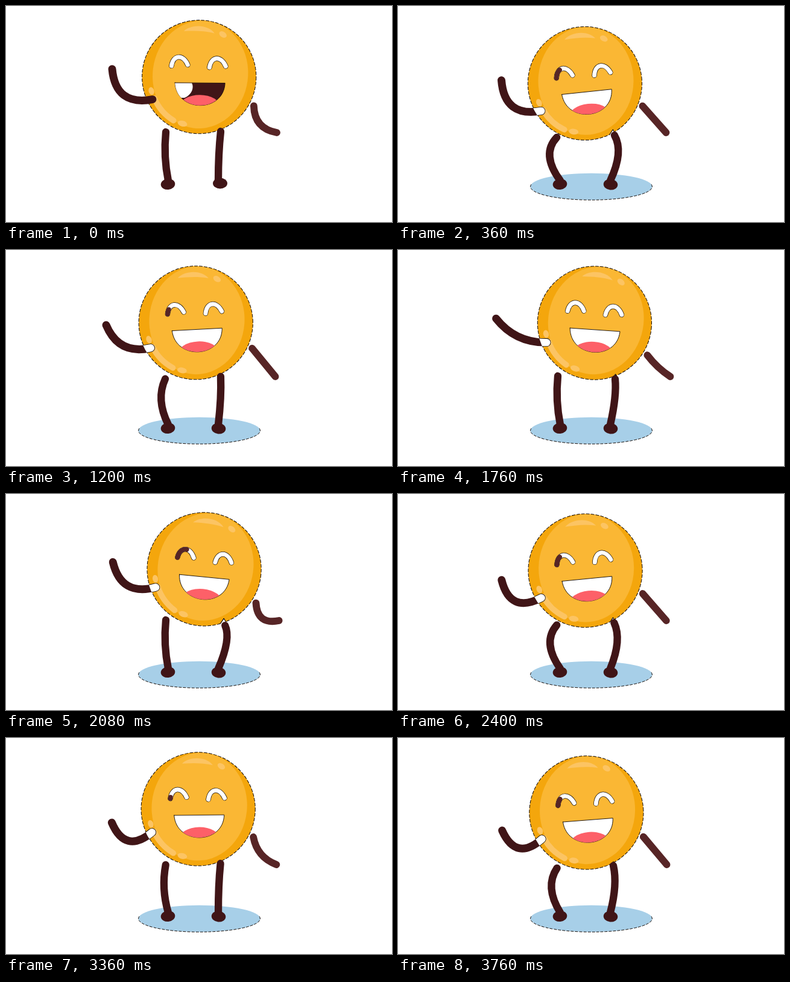
An HTML page with a canvas for the animation above (3800 ms loop, 640 by 360 pixels).

```html
<!DOCTYPE html>
<html lang="en">
<head>
<meta charset="utf-8">
<title>Dancing coin</title>
<style>
html, body { margin: 0; width: 100%; height: 100%; overflow: hidden; background: #fff; }
canvas { display: block; }
</style>
</head>
<body>
<canvas id="stage" width="640" height="360"></canvas>
<script>
const ctx = document.getElementById('stage').getContext('2d');
const LOOP = 3800, STEP = 40, BEAT = 1112, RADIUS = 94.6;
const BROWN = '#401517', LIGHT_BROWN = '#572526', LINE = '#140c08';
const SHINE = '#fcc463';

const clamp01 = v => Math.max(0, Math.min(1, v));

function ellipse(x, y, rx, ry, fill, turn = 0) {
  ctx.beginPath();
  ctx.ellipse(x, y, rx, ry, turn, 0, Math.PI * 2);
  if (fill) {
    ctx.fillStyle = fill;
    ctx.fill();
  }
}

function stroke(width, color, dash = []) {
  ctx.setLineDash(dash);
  ctx.lineWidth = width;
  ctx.strokeStyle = color;
  ctx.stroke();
  ctx.setLineDash([]);
}

// Round-ended stroke from a to b that passes through m
function limb(a, m, b, width, color) {
  const control = i => 2 * m[i] - (a[i] + b[i]) / 2;
  ctx.beginPath();
  ctx.moveTo(...a);
  ctx.quadraticCurveTo(control(0), control(1), ...b);
  stroke(width, color);
}

// Midpoint of a and b, pushed sideways by bend
function joint(a, b, bend) {
  const dx = b[0] - a[0], dy = b[1] - a[1], length = Math.hypot(dx, dy);
  return [(a[0] + b[0]) / 2 - dy / length * bend, (a[1] + b[1]) / 2 + dx / length * bend];
}

// All moving parts follow one sway: lean runs from -1 (left) to 1 (right)
function poseAt(t) {
  const angle = t / BEAT * Math.PI * 2;
  const lean = -Math.sin(angle);
  const dip = 13.5 * lean * lean;
  const x = 320.2 + 11.5 * lean, y = 118.2 + dip;
  const turn = (.4 + 7.2 * lean) * Math.PI / 180;
  const attach = (px, py) => [
    x + px * Math.cos(turn) - py * Math.sin(turn),
    y + px * Math.sin(turn) + py * Math.cos(turn)
  ];

  // The waving arm sinks over the loop and stretches out once
  const reach = Math.exp(-(((t - 1560) / 350) ** 2));
  const leftHand = [176 + 5 * lean - 22 * reach, 105 + 38 * t / LOOP - 17 * lean];
  const leftShoulder = attach(-77, 38);

  const rightShoulder = attach(91, 47.5);
  const rightHand = [449 + 5 * lean, 211];
  const fold = 14 * clamp01(-2 * Math.sin(angle - .44));

  return {
    lean, dip, x, y, turn,
    leftArm: [leftHand, joint(leftHand, leftShoulder, 23 - 16 * reach), leftShoulder],
    rightArm: [rightShoulder, joint(rightShoulder, rightHand, fold), rightHand],
    wink: clamp01(lean > 0 ? 2.4 * (lean - .5) : -.4 * lean)
  };
}

function eye(x, y, darkShare) {
  ctx.beginPath();
  ctx.moveTo(x - 13, y + 8);
  ctx.bezierCurveTo(x - 10, y - 11, x + 6, y - 12, x + 14, y + 6);
  stroke(8.4, LINE);
  stroke(7, '#fff');
  if (darkShare > .04) stroke(7.6, LIGHT_BROWN, [darkShare * 42, 200]);
}

function mouth(dark) {
  ctx.save();
  ctx.beginPath();
  ctx.moveTo(-40, 10);
  ctx.lineTo(43, 10);
  ctx.bezierCurveTo(41, 60, -37, 60, -40, 10);
  ctx.closePath();
  ctx.fillStyle = dark ? BROWN : '#fff';
  ctx.fill();
  stroke(.9, LINE);
  ctx.clip();
  if (dark) {
    ctx.beginPath();
    ctx.moveTo(-41, 10.5);
    ctx.lineTo(-12, 10.5);
    ctx.bezierCurveTo(-8, 18, -12, 30, -24, 35);
    ctx.lineTo(-41, 35);
    ctx.fillStyle = '#fff';
    ctx.fill();
  }
  ellipse(1.5, 50, 34, 20, '#fd6068');
  ctx.restore();
}

function shines() {
  ctx.fillStyle = SHINE;
  ctx.beginPath();
  ctx.moveTo(-26, -76);
  ctx.bezierCurveTo(-14, -88, 14, -88, 25, -73);
  ctx.bezierCurveTo(8, -77, -8, -77, -26, -76);
  ctx.fill();
  ellipse(39, -71, 6.8, 4.6, SHINE, .6);
  ellipse(-79, 24, 4.5, 6.5, SHINE, -.3);
  limb([-74, 36], [-61, 57], [-42, 73], 9.5, SHINE);
  ellipse(-27, 78, 8, 4.8, SHINE, .25);
}

function coin({ x, y, turn, dip, wink }, darkMouth) {
  ctx.save();
  ctx.translate(x, y);
  ctx.rotate(turn);
  ellipse(0, 0, RADIUS, RADIUS, '#f4a60c');
  ctx.save();
  ctx.clip();
  ellipse(2, -4, 79, 90, '#fab734', .12);
  ctx.restore();
  ellipse(0, 0, RADIUS, RADIUS);
  stroke(1, LINE, [5, 3]);
  shines();

  // The face slides down a little as the body dips
  ctx.translate(0, dip * .4);
  eye(-33, -26, wink);
  eye(30, -24, 0);
  mouth(darkMouth);
  ctx.restore();
}

function legs({ lean, dip }) {
  const left = 10 * Math.max(0, -lean), right = 10 * Math.max(0, lean);
  limb([265 - left * .2, 210 + left], [264 - left * 1.4, 251], [269, 291], 12.3, BROWN);
  limb([356 + dip * .6 + lean * 4, 209 + dip * .6 + right * .8],
    [353 + dip * 1.4 + lean * 3.5, 248], [352, 291], 12.3, BROWN);
}

function feet(resting) {
  ellipse(268.5, 297, 11.8, 9, BROWN, -.1);
  if (resting) ellipse(355, 295.5, 12, 9, BROWN);
  else ellipse(352.5, 297.5, 11.8, 9, BROWN, .1);
}

function shadow() {
  ellipse(320.5, 301, 101, 22.3, '#a7cfe8');
  ctx.beginPath();
  ctx.ellipse(320.5, 301, 101, 22.3, 0, -.15, Math.PI + .15);
  stroke(1, LINE, [4, 3]);
}

// Limbs read as cut-outs where they cross the coin
function cutouts({ x, y, lean, leftArm }) {
  ctx.save();
  ellipse(x, y, RADIUS + .6, RADIUS + .6);
  ctx.clip();
  limb(...leftArm, 14, LINE);
  limb(...leftArm, 12.4, '#fff');

  const tipX = 359 + lean * 3, tipY = 206 + Math.max(0, lean) * 2;
  ctx.beginPath();
  ctx.moveTo(tipX - 6, tipY + 9);
  ctx.lineTo(tipX, tipY);
  ctx.lineTo(tipX + 5, tipY + 8);
  ctx.lineTo(tipX + 5, tipY + 20);
  ctx.lineTo(tipX - 6, tipY + 20);
  ctx.fillStyle = '#fff';
  ctx.fill();
  stroke(1.2, LINE);
  ctx.restore();
}

function draw(t) {
  const opening = t < STEP;
  const pose = poseAt(t);
  ctx.fillStyle = '#fff';
  ctx.fillRect(0, 0, 640, 360);
  ctx.lineCap = ctx.lineJoin = 'round';

  if (!opening) shadow();
  limb(...pose.rightArm, 11.8, LIGHT_BROWN);
  ctx.lineCap = 'butt';
  ctx.lineCap = 'round';
  coin(pose, opening);
  limb(...pose.leftArm, 13, BROWN);
  if (!opening) cutouts(pose);
  legs(pose);
  feet(opening);
}

const start = performance.now();
function tick() {
  const t = (performance.now() - start) % LOOP;
  draw(Math.floor(t / STEP) * STEP);
  requestAnimationFrame(tick);
}
tick();
</script>
</body>
</html>
```
